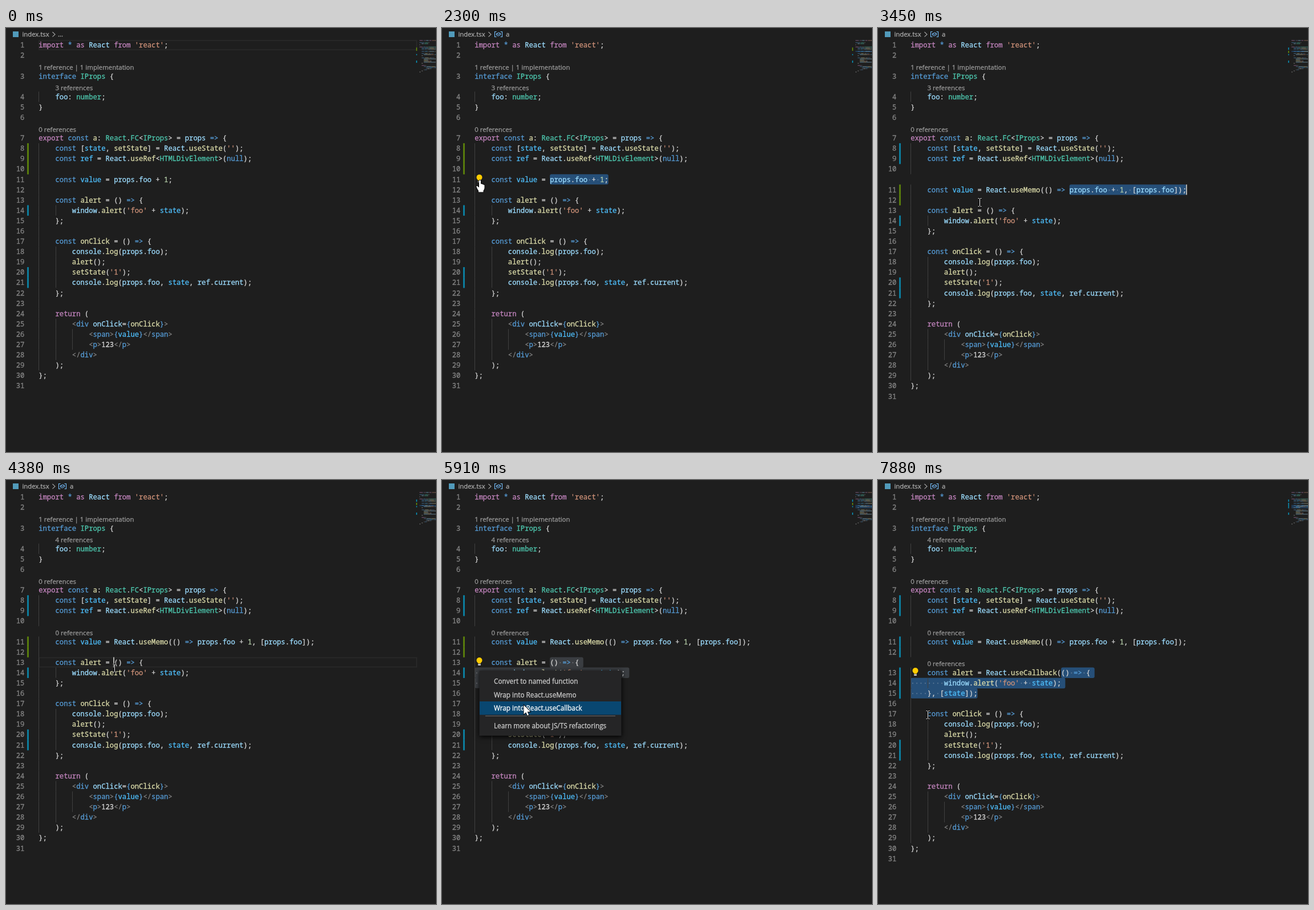
An HTML page with a canvas for the animation above (8 s loop, 754 px wide and 743 px high).

```html
<!DOCTYPE html>
<html lang="en">
<head>
<meta charset="utf-8">
<title>Editor refactoring</title>
<style>
html, body { margin: 0; height: 100%; overflow: hidden; background: #1e1e1e; }
canvas { display: block; }
</style>
</head>
<body>
<canvas id="stage" width="754" height="743"></canvas>
<script>
const ctx = document.getElementById('stage').getContext('2d');
const LOOP = 8000, LEFT = 57.2, CW = 7.33, ROW = 18.095, TOP = 20.95, BASE = 13.33;
const MONO = '12.22px "Noto Sans Mono", monospace';
const ui = size => size + 'px "Open Sans", "Noto Sans", sans-serif';

const code = `import * as React from 'react';

interface IProps {
    foo: number;
}

export const a: React.FC<IProps> = props => {
    const [state, setState] = React.useState('');
    const ref = React.useRef<HTMLDivElement>(null);

    const value = props.foo + 1;

    const alert = () => {
        window.alert('foo' + state);
    };

    const onClick = () => {
        console.log(props.foo);
        alert();
        setState('1');
        console.log(props.foo, state, ref.current);
    };

    return (
        <div onClick={onClick}>
            <span>{value}</span>
            <p>123</p>
        </div>
    );
};
`.split('\n');

const colors = {};
const paint = (color, words) => words.split(' ').forEach(w => colors[w] = color);
paint('#c586c0', 'import as from export return');
paint('#569cd6', 'const interface null div span p * =>');
paint('#4ec9b0', 'IProps number FC HTMLDivElement');
paint('#dcdcaa', 'useState useRef useMemo useCallback setState alert onClick log a');
paint('#4fc1ff', 'state value ref');
paint('#d4d4d4', '123');

const TOKEN = /'[^']*'|\w+|=>|\S/g;

function tokens(text, jsx) {
  return [...text.matchAll(TOKEN)].map(m => {
    const s = m[0], rest = text.slice(m.index + s.length);
    let color = colors[s];
    if (s[0] === "'") color = '#ce9178';
    else if (s === 'React' && rest.startsWith('.FC')) color = '#4ec9b0';
    else if (s === 'onClick' && rest[0] === '=' || s === 'ref' && rest[0] === '.') color = '#9cdcfe';
    else if (jsx && /[<>\/]/.test(s)) color = '#808080';
    else if (jsx && /[{}]/.test(s)) color = '#569cd6';
    else if (!color) color = /^\d/.test(s) ? '#b5cea8' : /\w/.test(s) ? '#9cdcfe' : '#d4d4d4';
    return { s, color, col: m.index };
  });
}

const lerp = (a, b, p) => a + (b - a) * Math.max(0, Math.min(1, p));
const colX = col => LEFT + col * CW;

function rect(x, y, w, h, color) {
  ctx.fillStyle = color;
  ctx.fillRect(x, y, w, h);
}

// a hairline stroke gives the slightly heavy look of screen text
function text(s, x, y, color, font) {
  ctx.font = font;
  ctx.fillStyle = ctx.strokeStyle = color;
  ctx.lineWidth = .3;
  ctx.fillText(s, x, y);
  ctx.strokeText(s, x, y);
}

function round(x, y, w, h, r, color) {
  ctx.fillStyle = color;
  ctx.beginPath();
  ctx.roundRect(x, y, w, h, r);
  ctx.fill();
}

function line(points, color, width) {
  ctx.strokeStyle = color;
  ctx.lineWidth = width;
  ctx.beginPath();
  points.forEach(([x, y], i) => i ? ctx.lineTo(x, y) : ctx.moveTo(x, y));
  ctx.stroke();
}

// time, x, y of the pointer's hot spot
const route = [
  [70, 690, 722], [300, 420, 350], [480, 230, 118], [620, 163, 190], [760, 180, 262],
  [840, 190, 266], [1060, 190, 266], [1380, 299, 261], [1530, 299, 261], [1650, 322, 200],
  [1780, 250, 95], [1920, 110, 240], [2060, 120, 510], [2200, 50, 300], [2300, 66, 266],
  [2380, 66, 266], [2760, 150, 332], [2830, 174, 311], [2910, 178, 305], [3850, 178, 305],
  [4160, 190, 320], [4300, 190, 320], [4640, 192, 356], [4950, 192, 356], [5180, 70, 318],
  [5420, 70, 318], [5800, 146, 396], [6050, 140, 391], [6210, 148, 399], [6800, 148, 399],
  [7100, 238, 328], [7400, 150, 380], [7710, 79, 411], [7880, 87, 411]
];

function pointer(t) {
  const i = route.findIndex(k => k[0] > t);
  if (i === 0) return null;
  if (i < 0) return route[route.length - 1].slice(1);
  const a = route[i - 1], b = route[i], p = (t - a[0]) / (b[0] - a[0]);
  return [Math.round(lerp(a[1], b[1], p)), Math.round(lerp(a[2], b[2], p))];
}

function selection(t) {
  if (t < 1060) return [1, 0, 1, 0];
  if (t < 3080) return [11, 18, 11, 18 + Math.round(lerp(0, 14, (t - 1060) / 320))];
  if (t < 4300) return [11, 38, 11, 66];
  if (t < 4400) return [13, 18, 13, 18];
  if (t < 4520) return [13, 18, 14, 18];
  if (t < 6360) return [13, 18, 15, 6];
  return [13, 36, 15, 16];
}

function menuAt(t) {
  const link = 'Learn more about JS/TS refactorings';
  if (t >= 2380 && t < 3080) return { y: 280, items: ['Wrap into React.useMemo', link] };
  if (t >= 5420 && t < 6050) return {
    y: 334, items: ['Convert to named function', 'Wrap into React.useMemo', 'Wrap into React.useCallback', link]
  };
}

function linesAt(t) {
  const out = code.slice();
  if (t >= 3080) out[10] = '    const value = React.useMemo(() => props.foo + 1, [props.foo]);';
  if (t >= 6360) {
    out[12] = '    const alert = React.useCallback(() => {';
    out[14] = '    }, [state]);';
  }
  return out;
}

function lensesAt(t) {
  const out = { 3: '1 reference | 1 implementation', 4: (t < 4300 ? 3 : 4) + ' references', 7: '0 references' };
  if (t >= 3080) out[11] = t < 4300 ? '' : '0 references';
  if (t >= 6520) out[13] = t < 6600 ? '' : '0 references';
  return out;
}

function changeColor(n, t) {
  const blue = '#0c7d9d', green = '#587c0c';
  if (n === 14 || n === 20 || n === 21) return blue;
  if (t < 3080) return n >= 8 && n <= 10 ? green : null;
  if (n === 8 || n === 9) return blue;
  if (n === 11 || n === 12) return t < 6520 ? green : blue;
  return t >= 6520 && (n === 13 || n === 15) ? blue : null;
}

function drawTitle(t) {
  const gray = '#a9a9a9';
  rect(12, 6, 10, 10, '#519aba');
  text('index.tsx', 28.5, 15, gray, ui(11.3));
  line([[81.5, 7], [86, 11.2], [81.5, 15.4]], gray, 1.1);
  if (t < 1060) return text('...', 91, 15, gray, ui(11.3));
  const blue = '#75beff';
  line([[95.5, 6.5], [92.5, 6.5], [92.5, 15.5], [95.5, 15.5]], blue, 1.1);
  line([[102.5, 6.5], [105.5, 6.5], [105.5, 15.5], [102.5, 15.5]], blue, 1.1);
  line([[95.5, 10], [99.5, 8], [102.5, 9.5], [102.5, 12], [98.5, 14], [95.5, 12.5],
    [95.5, 10], [98.5, 11.5], [102.5, 9.5]], blue, 1);
  text('a', 112, 15, gray, ui(11.3));
}

function drawMinimap(lines, sel, t) {
  const unit = .952, pitch = 2 * unit;
  lines.forEach((s, i) => {
    const y = TOP + i * pitch, n = i + 1, mark = changeColor(n, t);
    if (mark) rect(719, y, 2, pitch, mark);
    if (t >= 1060 && n >= sel[0] && n <= sel[2]) rect(725, y, 29, pitch, '#203c58');
    ctx.globalAlpha = .45;
    for (const k of tokens(s, n > 24 && n < 29)) {
      rect(725 + k.col * unit, y + .3, k.s.length * unit, 1.2, k.color);
    }
    ctx.globalAlpha = 1;
  });
}

function drawSelection(lines, rows, [l1, c1, l2, c2], idle) {
  for (let n = l1; n <= l2; n++) {
    const s = lines[n - 1], from = n === l1 ? c1 : 0, to = n === l2 ? c2 : s.length;
    const x = colX(from), y = rows[n - 1];
    round(x, y, colX(to + (n < l2 ? 1 : 0)) - x, ROW + (n < l2 ? .4 : 0), 3, idle ? '#3a3d41' : '#264f78');
    for (let c = from; c < to; c++) {
      if (s[c] === ' ') text('·', colX(c), Math.round(y + BASE), 'rgba(227,228,226,.25)', MONO);
    }
  }
}

function drawBulb(y) {
  ctx.fillStyle = '#ffcc00';
  ctx.beginPath();
  ctx.arc(65.5, y - 3, 5, 0, 7);
  ctx.fill();
  rect(63, y, 5, 2.5, '#ffcc00');
  round(63, y + 3.2, 5, 2.8, 1, '#c5c5c5');
}

function drawMenu({ y, items }, mouse) {
  const h = 20 + items.length * 23.5;
  ctx.save();
  ctx.shadowColor = '#000';
  ctx.shadowBlur = 8;
  ctx.shadowOffsetY = 2;
  rect(65.5, y, 249, h, '#252526');
  ctx.restore();
  items.forEach((s, i) => {
    const last = i === items.length - 1, top = y + 7 + i * 23.5 + (last ? 7.5 : 0);
    if (last) rect(76, Math.round(top - 6), 228, 1, '#6a6a6a');
    const over = mouse[0] > 65 && mouse[1] >= top && mouse[1] < top + 23.5;
    if (over) rect(66, top, 248, 23.5, '#094771');
    text(s, 91, Math.round(top + 16), over ? '#fff' : '#ccc', ui(11.75));
  });
}

const shapes = {
  arrow: new Path2D('M0 0V16L3.7 12.6L6.2 18.2L8.6 17.1L6.2 11.6H11.3Z'),
  hand: new Path2D('M-1.5 1.2Q0 -1 1.5 1.2V7Q3 5.6 4 7.6Q5.5 6.6 6.3 8.4Q8 7.8 8 9.5V14Q7.5 17 6 18.5V21H-2.5V18.5Q-5 15 -6 12Q-6.5 9.5 -4.5 10.5L-1.5 13Z'),
  beam: new Path2D('M-3 -7H-1L0 -6L1 -7H3M0 -6V6M-3 7H-1L0 6L1 7H3')
};

function drawPointer([x, y], kind) {
  const beam = kind === 'beam';
  ctx.save();
  ctx.translate(x + .5, y + .5);
  ctx.strokeStyle = '#000';
  ctx.lineWidth = beam ? 2.6 : 1.6;
  ctx.stroke(shapes[kind]);
  ctx.strokeStyle = ctx.fillStyle = '#fff';
  ctx.lineWidth = 1;
  if (beam) ctx.stroke(shapes.beam);
  else ctx.fill(shapes[kind]);
  ctx.restore();
}

function caretOn(t) {
  const since = [6360, 4640, 4300, 3080, 1380, 1060].find(k => t >= k);
  return since && (t - since) % 1000 < 500;
}

function draw(t) {
  const lines = linesAt(t), lenses = lensesAt(t), sel = selection(t);
  const menu = menuAt(t), mouse = pointer(t), rows = [];
  rect(0, 0, 754, 743, '#1e1e1e');
  drawTitle(t);

  let row = 0;
  lines.forEach((s, i) => {
    if (lenses[i + 1] !== undefined) {
      const indent = s.search(/\S/);
      text(lenses[i + 1], colX(indent), Math.round(TOP + row * ROW + 16), '#999', ui(11.45));
      row++;
    }
    rows[i] = TOP + row++ * ROW;
  });

  const empty = sel[0] === sel[2] && sel[1] === sel[3];
  if (empty) {
    ctx.strokeStyle = '#282828';
    ctx.lineWidth = 1.9;
    ctx.strokeRect(58, rows[sel[0] - 1] + .95, 662, ROW - 1.9);
  } else drawSelection(lines, rows, sel, menu);

  lines.forEach((s, i) => {
    const n = i + 1, y = rows[i], mark = changeColor(n, t);
    const level = s ? s.search(/\S/) / 4 : n > 7 && n < 30 ? 1 : 0;
    for (let g = 0; g < level; g++) rect(Math.round(colX(g * 4)), y, 1, ROW, '#404040');
    if (mark) rect(37, y, 3, ROW + .3, mark);
    const base = Math.round(y + BASE);
    text(n, 32.3 - String(n).length * CW, base, '#858585', MONO);
    for (const k of tokens(s, n > 24 && n < 29)) text(k.s, colX(k.col), base, k.color, MONO);
  });

  drawMinimap(lines, sel, t);
  if (!menu && caretOn(t)) rect(Math.round(colX(sel[3])) - 1, rows[sel[2] - 1], 2, ROW, '#aeafad');

  const bulbLine = t >= 1530 && t < 3080 ? 11 : t >= 4800 ? 13 : 0;
  const bulbY = bulbLine && rows[bulbLine - 1] + 8.5;
  if (bulbLine) drawBulb(bulbY);
  if (menu) drawMenu(menu, mouse);
  if (!mouse) return;
  const onBulb = bulbLine && mouse[0] < 74 && Math.abs(mouse[1] - bulbY) < 9;
  drawPointer(mouse, menu || t >= 6050 && t < 6210 ? 'arrow' : onBulb ? 'hand' : 'beam');
}

const start = performance.now();
function tick() {
  draw((performance.now() - start) % LOOP);
  requestAnimationFrame(tick);
}
tick();
</script>
</body>
</html>
```
